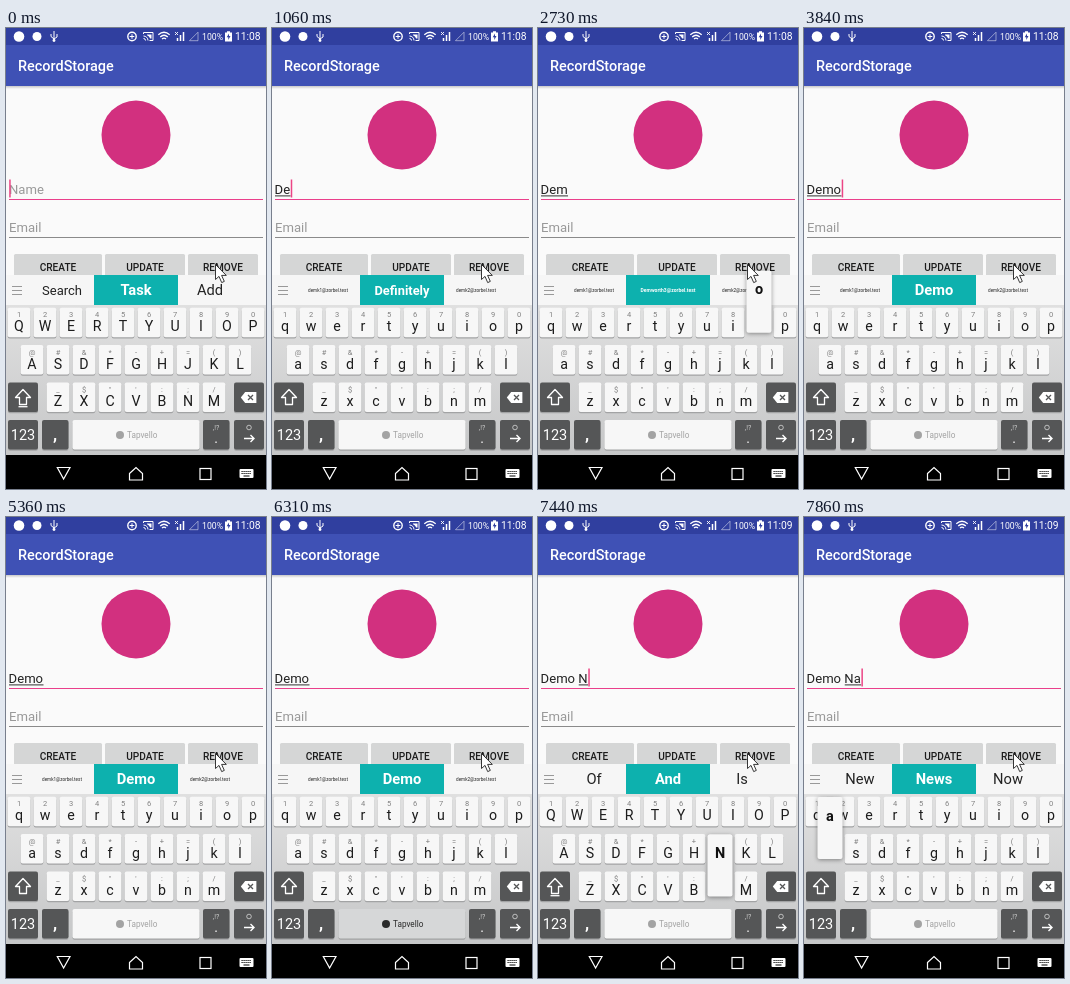
An HTML page that plays this animation: 260 by 461 pixels, repeating every 8000 ms.

```html
<!DOCTYPE html>
<html lang="en">
<head>
<meta charset="utf-8">
<title>Form typing</title>
<style>
  html, body { margin: 0; width: 100%; height: 100%; overflow: hidden; background: #000; }
  svg { display: block; width: 260px; height: 461px; }
  text { font-family: Roboto, sans-serif; white-space: pre; }
  .mid { text-anchor: middle; }
  .field { font-size: 13.1px; fill: #222; }
  .hint { fill: #999; }
  .button { font-size: 10.1px; font-weight: 500; fill: #1c1c1c; }
  .letter { font-size: 14.2px; fill: #1c1c1c; }
  .alt { font-size: 7.5px; fill: #808080; }
  .popup { filter: drop-shadow(0 1.5px 2px rgba(0, 0, 0, .4)); }
  .line { fill: none; stroke: #fff; }
</style>
</head>
<body>
<svg viewBox="0 0 260 461">
  <defs>
    <linearGradient id="board" x2="0" y2="1">
      <stop stop-color="#e0e0e0"/><stop offset="1" stop-color="#c6c7c8"/>
    </linearGradient>
    <linearGradient id="shade" x2="0" y2="1">
      <stop stop-color="#000" stop-opacity=".2"/><stop offset="1" stop-color="#000" stop-opacity="0"/>
    </linearGradient>
  </defs>

  <rect width="260" height="461" fill="#fafafa"/>
  <rect y="17" width="260" height="41" fill="#3f51b5"/>
  <rect y="58" width="260" height="3" fill="url(#shade)"/>
  <rect width="260" height="17" fill="#303f9f"/>
  <text x="12" y="43" font-size="14.44" font-weight="500" fill="#fff">RecordStorage</text>

  <g fill="#fff">
    <circle cx="13" cy="8.5" r="5.3"/>
    <circle cx="31" cy="8.5" r="4.5"/>
    <g class="line">
      <path d="M48 3V13M45 6V8.5L48 11L51 9V6"/>
      <circle cx="126" cy="8.5" r="4.2" stroke-width="1.4"/>
      <path d="M126 6.2V10.8M123.7 8.5H128.3"/>
      <path d="M137.5 6V4.5H147V12.5H143.5M137.5 8A4.5 4.5 0 0 1 142 12.5M137.5 10.5A2 2 0 0 1 139.5 12.5"/>
      <path d="M152.3 6.8Q158 1.8 163.7 6.8M154.2 9Q158 5.6 161.8 9M156 11Q158 9.2 160 11" stroke-width="1.3"/>
      <path d="M169 4L172 7M172 4L169 7" stroke-width=".9"/>
      <path d="M171.5 13V10M174.5 13V7M177.5 13V4" stroke-width="1.5"/>
      <path d="M183.5 12.7H192V4.2Z" stroke-width=".8" opacity=".6"/>
    </g>
    <circle cx="48" cy="12.5" r="1.4"/>
    <path d="M141 6.5H145.5V10.5H144.2A6.5 6.5 0 0 0 141 7.2Z"/>
    <path d="M219 4.5H221V3.2H224V4.5H226V13.5H219Z"/>
    <path d="M223 5.5L220.7 9.3H222.3V12L224.5 8H223Z" fill="#303f9f"/>
    <text x="196" y="12" font-size="8.7">100%</text>
    <text id="clock" x="229" y="12.4" font-size="10.3"></text>
  </g>

  <circle cx="130" cy="107" r="34.5" fill="#d2307f"/>

  <rect x="3" y="171" width="254" height="1" fill="#ea3f8b"/>
  <text id="nameHint" class="field hint" x="3" y="166">Name</text>
  <text id="done" class="field" x="2.6" y="166"></text>
  <text id="word" class="field" y="166"></text>
  <rect id="under" y="167.4" height="1" fill="#333"/>
  <rect id="caret" y="151.5" width="1.5" height="18" fill="#ec4585"/>
  <text class="field hint" x="3" y="204">Email</text>
  <rect x="3" y="209" width="254" height="1" fill="#8a8a8a"/>

  <g fill="#d5d6d6">
    <rect x="8" y="226" width="88" height="26" rx="1.5"/>
    <rect x="99" y="226" width="80" height="26" rx="1.5"/>
    <rect x="182" y="226" width="70" height="26" rx="1.5"/>
  </g>
  <text class="button mid" x="52" y="243">CREATE</text>
  <text class="button mid" x="139" y="243">UPDATE</text>
  <text class="button mid" x="217" y="243">REMOVE</text>

  <rect y="247" width="260" height="30" fill="#f6f6f6"/>
  <rect x="88" y="247" width="84" height="30" fill="#0db1ae"/>
  <path d="M6 258.5H16M6 262.5H16M6 266.5H16" stroke="#999"/>
  <text class="word mid" x="56" fill="#222"></text>
  <text class="word mid" x="130" fill="#fff" font-weight="700"></text>
  <text class="word mid" x="204" fill="#222"></text>

  <rect y="277" width="260" height="150" fill="url(#board)"/>
  <g id="keys"></g>

  <path class="line" d="M17 361.5L24.5 369.5H20.5V376.5H13.5V369.5H9.5Z" stroke-width="1.3" stroke-linejoin="round"/>
  <path id="shiftBar" class="line" d="M12.5 378.7H21.5" stroke-width="1.3"/>
  <path d="M234.8 369.5L239.2 364H250.4V375H239.2Z" fill="#fff"/>
  <path d="M242 367L247 372M247 367L242 372" stroke="#555657" stroke-width="1.3"/>
  <text class="mid" x="17" y="412" font-size="14.5" fill="#fff">123</text>
  <text class="mid" x="49" y="412" font-size="17" font-weight="700" fill="#fff">,</text>
  <text class="mid" x="210" y="415" font-size="14" fill="#fff">.</text>
  <text class="mid" x="210" y="402" font-size="7" fill="#ccc">,!?</text>
  <circle class="line" cx="243" cy="399.5" r="2.3" stroke-width=".8" opacity=".75"/>
  <path class="line" d="M238 410.5H248M244.5 407L248 410.5L244.5 414" stroke-width="1.4"/>
  <g id="brand">
    <circle cx="114" cy="407" r="4"/>
    <text x="121" y="410.3" font-size="8.2">Tapvello</text>
  </g>

  <g id="popup" class="popup">
    <rect width="25" height="62" rx="2" fill="#f7f7f7"/>
    <text id="big" class="mid" x="12.5" y="23.5" font-size="14.5" font-weight="700" fill="#111"></text>
  </g>

  <rect y="427" width="260" height="34" fill="#000"/>
  <g class="line" stroke-width="1.2">
    <path d="M51.3 439.5H64L57.6 451Z"/>
    <path d="M123.5 445.5L130 439.5L136.5 445.5V452H123.5Z"/>
    <rect x="194" y="440.5" width="11" height="11"/>
  </g>
  <rect x="233.5" y="441" width="14" height="9" rx="1" fill="#fff"/>
  <path d="M235.5 443.5H245.5M235.5 445.5H245.5" stroke="#000" stroke-dasharray="1.2 .8"/>
  <path d="M237.5 448H243.5" stroke="#000"/>

  <path d="M209.5 236.5V251.5L213 248.4L215.7 254.6L218.3 253.4L215.6 247.4H220.3Z" fill="#fff" stroke="#222" stroke-width=".9"/>
</svg>

<script>
const LOOP = 8000;
const $ = id => document.getElementById(id);
const slots = [...document.querySelectorAll('.word')];
const keys = {};

function add(parent, tag, attrs, label) {
  const el = document.createElementNS('http://www.w3.org/2000/svg', tag);
  for (const name in attrs) el.setAttribute(name, attrs[name]);
  if (label) el.textContent = label;
  return parent.appendChild(el);
}

function cap(parent, x, y, width, fill) {
  add(parent, 'rect', { x, y: y + 1.2, width, height: 29.5, rx: 2, fill: '#a2a3a4' });
  return add(parent, 'rect', { x, y, width, height: 29.5, rx: 2, fill });
}

// Letter rows: letters, secondary symbols, centre of the first key
[
  ['qwertyuiop', '1234567890', 13],
  ['asdfghjkl', '@#&*-+=()', 26],
  ['zxcvbnm', '_$"\':;/', 52]
].forEach(([letters, alts, first], row) => {
  const y = 279.7 + row * 37.4;
  [...letters].forEach((name, i) => {
    const x = first + i * 26;
    const g = add($('keys'), 'g', {});
    cap(g, x - 11.3, y, 22.6, '#f7f7f7');
    add(g, 'text', { class: 'alt mid', x, y: y + 9.5 }, alts[i]);
    const label = add(g, 'text', { class: 'letter mid', x, y: y + 23.5 }, name);
    keys[name] = { g, label, x, y };
  });
});

const dark = '#555657';
[[2, 354.5], [228, 354.5], [2, 392], [228, 392]].forEach(([x, y]) => cap($('keys'), x, y, 30, dark));
[36, 197].forEach(x => cap($('keys'), x, 392, 26.5, dark));
const space = cap($('keys'), 66.5, 392, 127, '#f7f7f7');

const mails = mid => ['demk1@zorbel.test', mid, 'demk2@zorbel.test'];

// Each step changes only the named parts of the state
const steps = [
  [0, { done: '', word: '', caret: 1, caps: 1, pop: '', press: 0, clock: '11:08', words: ['Search', 'Task', 'Add'] }],
  [540, { pop: 'd' }],
  [660, { word: 'D' }],
  [1060, { word: 'De', pop: '', caps: 0, words: mails('Definitely') }],
  [1460, { caret: 0 }],
  [1720, { pop: 'm' }],
  [1850, { word: 'Dem', caret: 1, words: mails('Demworth3@zorbel.test') }],
  [1970, { pop: '' }],
  [2280, { caret: 0 }],
  [2730, { pop: 'o' }],
  [2870, { word: 'Demo', caret: 1, pop: '', words: mails('Demo') }],
  [3280, { caret: 0 }],
  [3840, { caret: 1 }],
  [4400, { caret: 0 }],
  [4800, { caret: 1 }],
  [5360, { caret: 0 }],
  [5760, { caret: 1 }],
  [6170, { press: 1 }],
  [6310, { caret: 0 }],
  [6610, { done: 'Demo ', word: '', caret: 1, caps: 1, press: 0, clock: '11:09', words: ['Of', 'And', 'Is'] }],
  [6860, { caret: 0 }],
  [7290, { pop: 'n' }],
  [7440, { word: 'N', caret: 1 }],
  [7590, { pop: '', words: ['New', 'News', 'Now'] }],
  [7710, { caps: 0 }],
  [7860, { word: 'Na', pop: 'a' }]
];

const show = (el, on) => el.setAttribute('visibility', on ? 'visible' : 'hidden');

function setWord(el, value, room) {
  const size = 14.7;
  el.textContent = value;
  el.style.fontSize = size + 'px';
  const fit = size * Math.min(1, room / el.getComputedTextLength());
  el.style.fontSize = fit + 'px';
  el.setAttribute('y', 262 + fit * .35);
}

function render(s) {
  $('clock').textContent = s.clock;
  $('done').textContent = s.done;
  $('word').textContent = s.word;
  const start = 2.6 + (s.done ? $('done').getComputedTextLength() : 0);
  const width = s.word ? $('word').getComputedTextLength() : 0;
  $('word').setAttribute('x', start);
  $('under').setAttribute('x', start + .4);
  $('under').setAttribute('width', width);
  $('caret').setAttribute('x', start + width + .6);
  show($('caret'), s.caret);
  show($('nameHint'), !s.done && !s.word);

  slots.forEach((el, i) => setWord(el, s.words[i], i === 1 ? 55 : 40));

  for (const name in keys) {
    keys[name].label.textContent = s.caps ? name.toUpperCase() : name;
    show(keys[name].g, name !== s.pop);
  }
  show($('shiftBar'), s.caps);
  show($('popup'), s.pop);
  if (s.pop) {
    const { x, y } = keys[s.pop];
    $('popup').setAttribute('transform', `translate(${x - 12.5} ${y - 37})`);
    $('big').textContent = s.caps ? s.pop.toUpperCase() : s.pop;
  }
  space.setAttribute('fill', s.press ? '#d6d7d8' : '#f7f7f7');
  $('brand').setAttribute('fill', s.press ? '#2a2a2a' : '#a3a3a3');
}

let current = -1;
function tick() {
  const t = performance.now() % LOOP;
  const past = steps.filter(([at]) => at <= t);
  if (past.length !== current) {
    current = past.length;
    render(Object.assign({}, ...past.map(([, change]) => change)));
  }
  requestAnimationFrame(tick);
}
tick();
</script>
</body>
</html>
```
